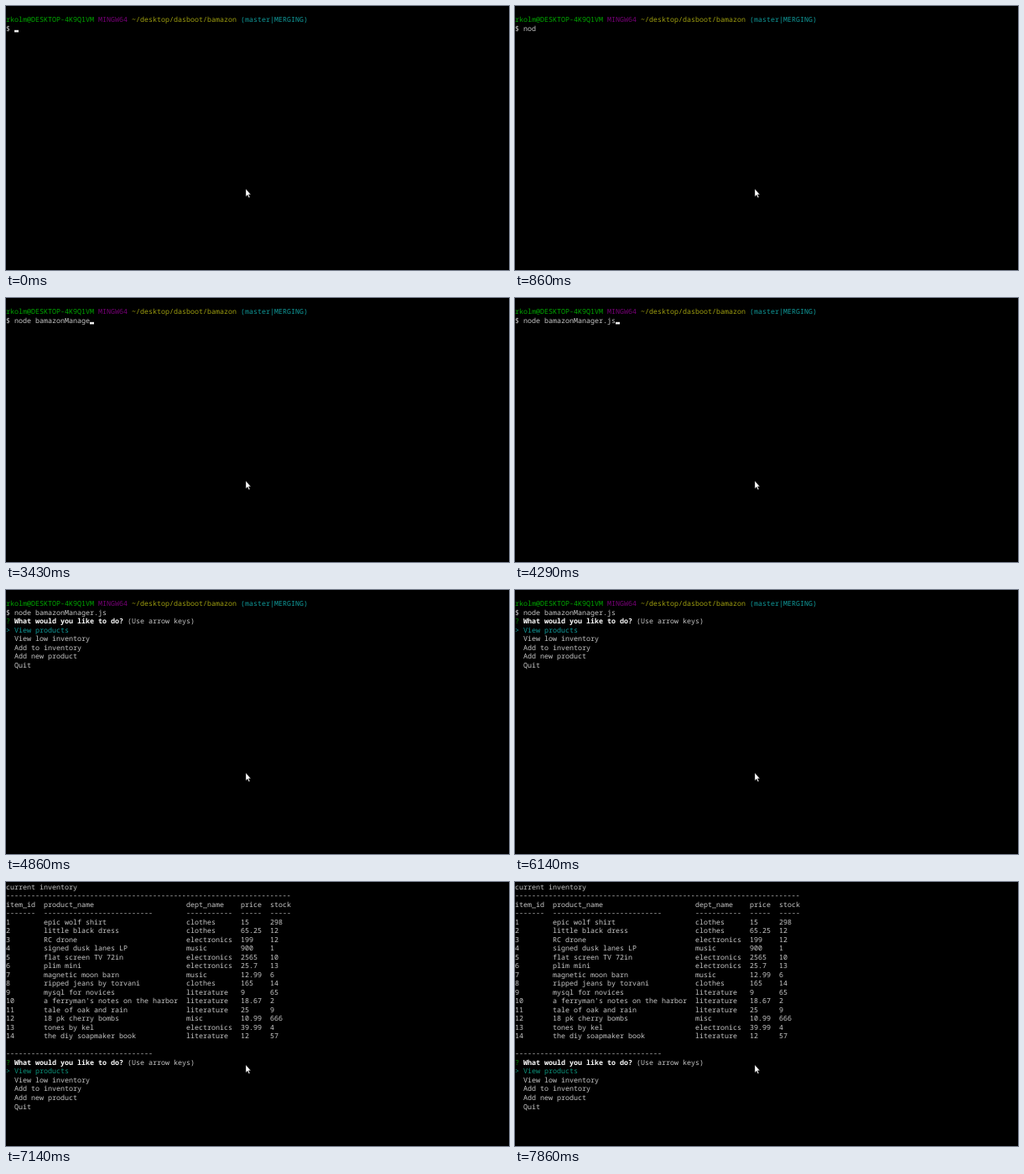
Animation, 600 px wide and 316 px high, one loop 8 s. Source, as an HTML page:

```html
<!DOCTYPE html>
<html lang="en">
<head>
<meta charset="utf-8">
<title>Terminal</title>
<style>
html, body { margin: 0; width: 100%; height: 100%; overflow: hidden; background: #000; }
svg { display: block; width: 600px; height: 316px; }
text {
  font: 8.333px "Noto Sans Mono", "DejaVu Sans Mono", monospace;
  white-space: pre;
  text-rendering: geometricPrecision;
  font-variant-ligatures: none;
}
</style>
</head>
<body>
<svg viewBox="0 0 600 316">
  <rect width="600" height="316" fill="#000"/>
  <g id="shell"></g>
  <g id="list"></g>
  <rect id="caret" width="5" height="2.6" fill="#f0f0f0"/>
  <path d="M286 218.8v9.4l2.1-1.9 1.5 3.2 1.4-.6-1.5-3.1h2.6z" fill="#fff" stroke="#000" stroke-width=".4"/>
</svg>
<script>
const LOOP = 8000, CELL = 5, LINE = 10.52, BASE = 8.5;
const GREY = "#c8c8c8", GREEN = "#00a800", PURPLE = "#780078", OLIVE = "#a0a010", TEAL = "#109a9a";
const $ = id => document.getElementById(id);
const shell = $("shell"), list = $("list"), caret = $("caret");

function put(parent, row, col, str, fill = GREY, weight = 400) {
  const el = document.createElementNS("http://www.w3.org/2000/svg", "text");
  el.setAttribute("x", col * CELL);
  el.setAttribute("y", BASE + row * LINE);
  el.setAttribute("fill", fill);
  el.style.fontWeight = weight;
  el.textContent = str;
  return parent.appendChild(el);
}

function group(parent) {
  return parent.appendChild(document.createElementNS("http://www.w3.org/2000/svg", "g"));
}

function addMenu(parent, row, pick) {
  put(parent, row, 0, "?", "#008000");
  put(parent, row, 2, "What would you like to do?", "#fff", 700);
  put(parent, row, 29, "(Use arrow keys)");
  put(parent, row + 1, 0, "> View products", pick);
  ["View low inventory", "Add to inventory", "Add new product", "Quit"]
    .forEach((s, i) => put(parent, row + 2 + i, 2, s));
}

// Prompt screen
put(shell, 1, 0, "rkolm@DESKTOP-4K9Q1VM", GREEN);
put(shell, 1, 22, "MINGW64", PURPLE);
put(shell, 1, 30, "~/desktop/dasboot/bamazon", OLIVE);
put(shell, 1, 56, "(master|MERGING)", TEAL);
put(shell, 2, 0, "$");
const typed = put(shell, 2, 2, "");
const menu = group(shell);
addMenu(menu, 3, TEAL);

// Inventory screen
const COLS = [0, 9, 43, 56, 63];
const addRow = (row, cells) => cells.forEach((s, i) => put(list, row, COLS[i], s));
const dash = n => "-".repeat(n);
const ITEMS = `epic wolf shirt|clothes|15|298
little black dress|clothes|65.25|12
RC drone|electronics|199|12
signed dusk lanes LP|music|900|1
flat screen TV 72in|electronics|2565|10
plim mini|electronics|25.7|13
magnetic moon barn|music|12.99|6
ripped jeans by torvani|clothes|165|14
mysql for novices|literature|9|65
a ferryman's notes on the harbor|literature|18.67|2
tale of oak and rain|literature|25|9
18 pk cherry bombs|misc|10.99|666
tones by kel|electronics|39.99|4
the diy soapmaker book|literature|12|57`.split("\n");

put(list, 0, 0, "current inventory");
put(list, 1, 0, dash(68));
addRow(2, ["item_id", "product_name", "dept_name", "price", "stock"]);
addRow(3, [7, 26, 11, 5, 5].map(dash));
ITEMS.forEach((s, i) => addRow(4 + i, [i + 1, ...s.split("|")]));
put(list, 19, 0, dash(35));
addMenu(list, 20, "#0c947c");

// Typing: [time, characters shown, caret visible]
const COMMAND = "node bamazonManager.js";
const KEYS = [
  [0, 0, 1], [290, 1, 1], [430, 2, 1], [570, 3, 1], [860, 3, 0],
  [1570, 4, 1], [1710, 5, 1], [1860, 8, 1], [2000, 12, 0], [2430, 12, 1],
  ...Array.from({ length: 10 }, (_, i) => [2710 + Math.floor(i * 143.5), 13 + i, 1]),
  [4430, 22, 0]
];
const MENU_AT = 4860, LIST_AT = 7140;

const show = (el, on) => { el.style.display = on ? "" : "none"; };

function draw(t) {
  const [, count, on] = KEYS.filter(k => k[0] <= t).pop();
  typed.textContent = COMMAND.slice(0, count);
  caret.setAttribute("x", (2 + count) * CELL);
  caret.setAttribute("y", 28.8);
  show(caret, on && t < MENU_AT);
  show(menu, t >= MENU_AT);
  show(shell, t < LIST_AT);
  show(list, t >= LIST_AT);
}

let start;
function tick(now) {
  start ??= now;
  draw((now - start) % LOOP);
  requestAnimationFrame(tick);
}
draw(0);
requestAnimationFrame(tick);
</script>
</body>
</html>
```
